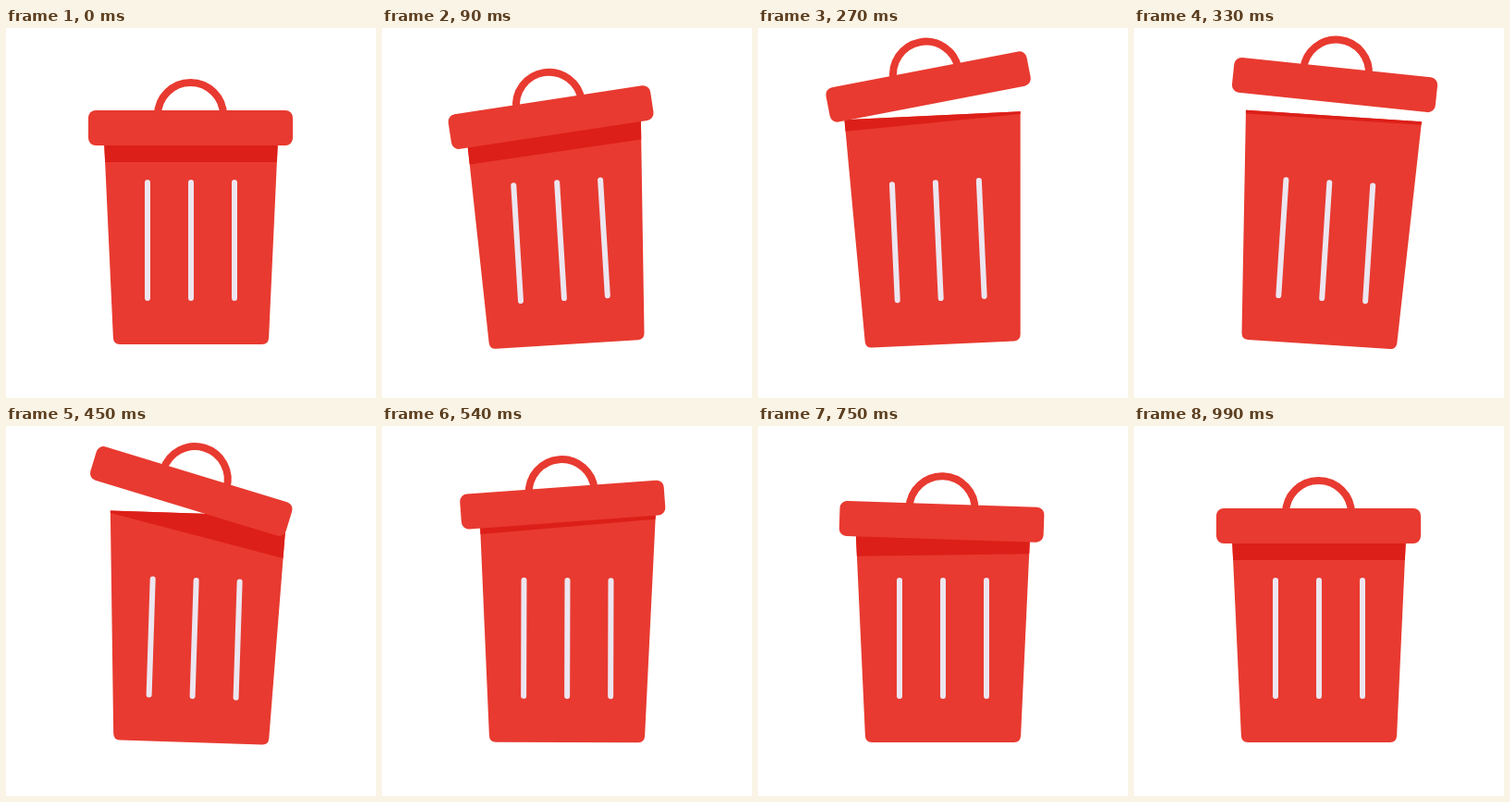
An HTML page that plays this animation: 400x400 px, repeating every 1050 ms.

```html
<!DOCTYPE html>
<html lang="en">
<head>
<meta charset="utf-8">
<title>Trash bin</title>
<style>
  html, body { margin: 0; width: 100%; height: 100%; overflow: hidden; background: #fff; }
  svg { display: block; width: 100%; height: 100%; }
</style>
</head>
<body>
<svg viewBox="0 0 400 400" fill="#e83a30">
  <g id="bin">
    <path d="M104.8 94.5H295.2L284.1 335Q283.7 342 277 342H123Q116.3 342 115.9 335Z"/>
    <path id="shade" fill="#dc1f18"/>
    <path d="M153 167V292M200 167V292M247 167V292" stroke="#ece6f0" stroke-width="6" stroke-linecap="round"/>
    <g id="lid">
      <path d="M164 100V94.5A35.5 35.5 0 0 1 235 94.5V100" fill="none" stroke="#e83a30" stroke-width="8"/>
      <rect x="89" y="89" width="221" height="38" rx="8"/>
    </g>
  </g>
</svg>
<script>
const LOOP = 1050, STEP = 30, TOP = 94.5;
const $ = id => document.getElementById(id);
const bin = $('bin'), lid = $('lid'), shade = $('shade');

// Cubic bezier (x1, 0, x2, 1), solved by bisection
const bezier = (x1, x2) => p => {
  let lo = 0, hi = 1;
  for (let i = 0; i < 24; i++) {
    const s = (lo + hi) / 2, r = 1 - s;
    if (3 * r * r * s * x1 + 3 * r * s * s * x2 + s ** 3 < p) lo = s; else hi = s;
  }
  return lo * lo * (3 - 2 * lo);
};
const easeIn = n => p => p ** n;
const easeOut = n => p => 1 - (1 - p) ** n;
const smooth = bezier(.333, .667);

// Keys: [time, value, easing towards this key]
const binTurn = [[0, 0], [210, -9], [330, 3.7], [570, 0]];
const lidTurn = [[0, 0], [210, -13], [450, 15.1, bezier(.333, .593)], [540, -4.3], [750, 1.9], [990, 0]];
const lidX = [[0, 0], [210, -4.4], [330, -.6], [450, -8], [990, 0, easeOut(2.65)]];
const lidY = [[0, 0], [330, -47, bezier(.3, .47)], [990, 0, bezier(.26, .24)]];
const shadeLeft = [[0, 50.5], [210, 31, easeIn(2)], [330, 3.5, easeOut(1.6)], [450, 2.5], [990, 50.5, easeOut(3)]];
const shadeRight = [[0, 50.5], [210, 2], [330, 3.5], [450, 45.3], [540, 6], [990, 50.5, easeOut(3)]];

function at(keys, t) {
  const i = keys.findIndex(k => k[0] > t);
  if (i < 0) return keys[keys.length - 1][1];
  const [t0, v0] = keys[i - 1], [t1, v1, ease = smooth] = keys[i];
  return v0 + (v1 - v0) * ease((t - t0) / (t1 - t0));
}

function draw(t) {
  const left = at(shadeLeft, t), right = at(shadeRight, t);
  const slope = .046;   // side walls lean inwards
  bin.setAttribute('transform', `rotate(${at(binTurn, t)} 200 342)`);
  lid.setAttribute('transform',
    `translate(${at(lidX, t)} ${at(lidY, t)}) rotate(${at(lidTurn, t)} 199.5 108)`);
  shade.setAttribute('d', `M104.8 ${TOP}H295.2L${295.2 - right * slope} ${TOP + right}` +
    `L${104.8 + left * slope} ${TOP + left}Z`);
}

function tick() {
  draw(Math.floor(performance.now() % LOOP / STEP) * STEP);
  requestAnimationFrame(tick);
}
tick();
</script>
</body>
</html>
```
